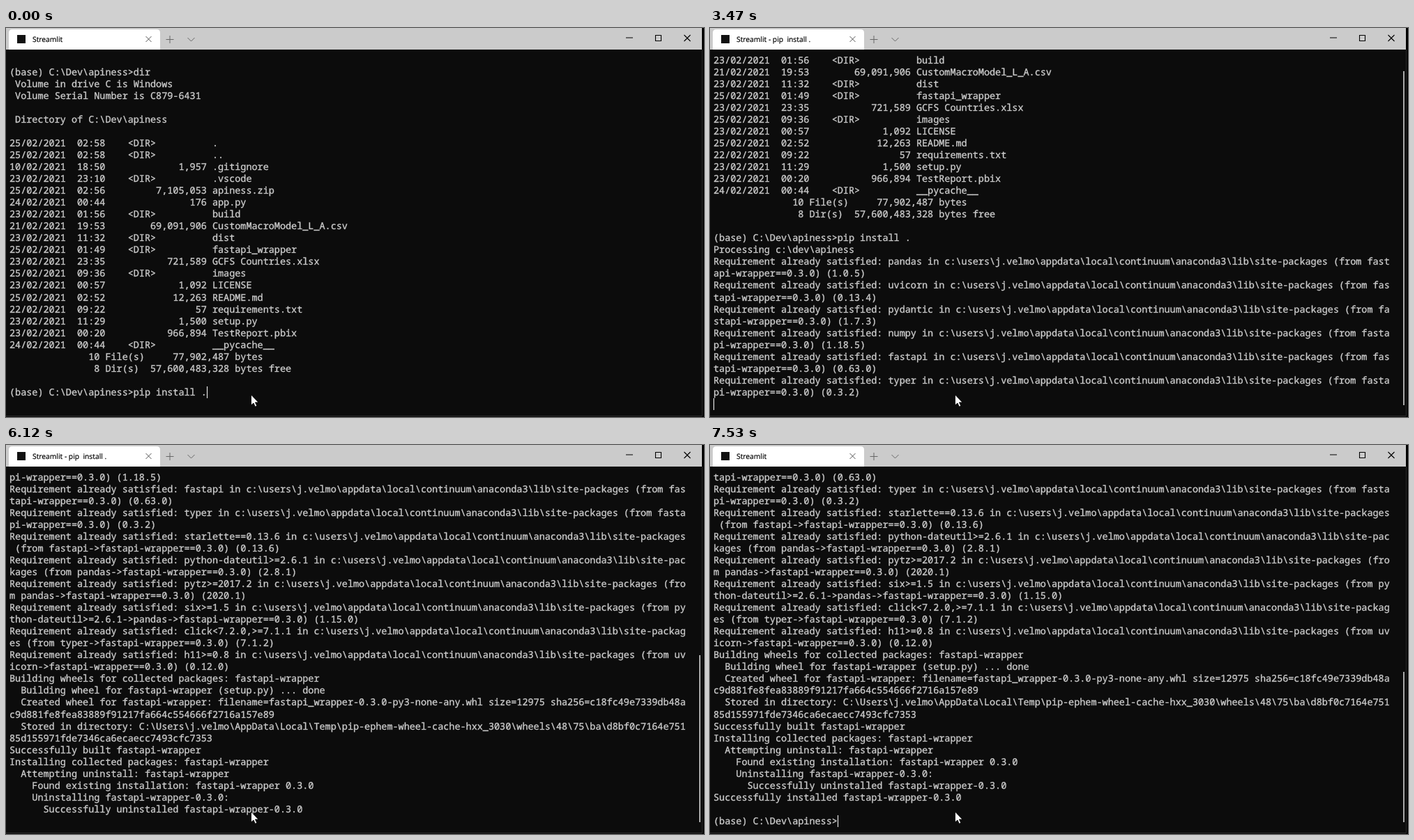
Recreate the animation shown at these times as an HTML page. Size 1001 by 559 pixels, loop 8000 ms.

```html
<!DOCTYPE html>
<html lang="en">
<head>
<meta charset="utf-8">
<title>Terminal</title>
<style>
  html, body { margin: 0; width: 100%; height: 100%; overflow: hidden; background: #0c0c0c; }
  #stage { position: relative; width: 1001px; height: 559px; overflow: hidden; background: #0c0c0c; }
  #stage > * { position: absolute; margin: 0; }
  svg { left: 0; top: 0; }
  #screen {
    left: 5px; top: 37.6px; color: #ccc; white-space: pre;
    font: 13.47px/17.05px "Noto Sans Mono", "DejaVu Sans Mono", monospace;
    text-rendering: geometricPrecision; font-variant-ligatures: none;
    -webkit-text-stroke: .35px #ccc;
  }
  #title {
    left: 38px; top: 9.5px; color: #000; white-space: pre;
    font: 10.3px/15px "Open Sans", "Noto Sans", sans-serif;
    text-rendering: geometricPrecision;
    -webkit-text-stroke: .2px #000;
  }
  #cursor { width: 1px; height: 17px; background: #fff; }
  #bar { left: 994px; width: 2px; background: #aaa; }
</style>
</head>
<body>
<div id="stage">
  <svg width="1001" height="559" fill="none">
    <path d="M0 0H998V31H0Z" fill="#cbcbcb"/>
    <path d="M998 0H1001V559H998Z" fill="#000"/>
    <path d="M998.5 31V557.5H0" stroke="#2a2a2a"/>
    <path d="M4 31V7Q4 2 9 2H216Q221 2 221 7V31Z" fill="#fff"/>
    <rect x="16" y="10" width="12" height="12" fill="#111"/>
    <path d="M200.5 12L208.5 20M208.5 12L200.5 20" stroke="#555"/>
    <path d="M229.5 16.5H240.5M235 11V22M260.5 14L265.5 19L270.5 14" stroke="#666"/>
    <path d="M889 14H899M931.5 10.5H939.5V18.5H931.5ZM972.5 10L981.5 19M981.5 10L972.5 19" stroke="#000" stroke-width="1.1"/>
  </svg>
  <pre id="screen"></pre>
  <div id="title"></div>
  <div id="bar"></div>
  <div id="cursor"></div>
  <svg width="1001" height="559">
    <path d="M351.5 527V542L355 539L357.4 544.2L359.8 543.1L357.4 538H362Z" fill="#fff" stroke="#000" stroke-width=".8"/>
  </svg>
</div>
<script>
const COLS = 120, ROWS = 30, CHAR = 8.082, ROW_H = 17.05, LOOP = 8000;
const prompt = String.raw`(base) C:\Dev\apiness>`;

const listing = String.raw`
${prompt}dir
 Volume in drive C is Windows
 Volume Serial Number is C879-6431

 Directory of C:\Dev\apiness

25/02/2021  02:58    <DIR>          .
25/02/2021  02:58    <DIR>          ..
10/02/2021  18:50             1,957 .gitignore
23/02/2021  23:10    <DIR>          .vscode
25/02/2021  02:56         7,105,053 apiness.zip
24/02/2021  00:44               176 app.py
23/02/2021  01:56    <DIR>          build
21/02/2021  19:53        69,091,906 CustomMacroModel_L_A.csv
23/02/2021  11:32    <DIR>          dist
25/02/2021  01:49    <DIR>          fastapi_wrapper
23/02/2021  23:35           721,589 GCFS Countries.xlsx
25/02/2021  09:36    <DIR>          images
23/02/2021  00:57             1,092 LICENSE
25/02/2021  02:52            12,263 README.md
22/02/2021  09:22                57 requirements.txt
23/02/2021  11:29             1,500 setup.py
23/02/2021  00:20           966,894 TestReport.pbix
24/02/2021  00:44    <DIR>          __pycache__
              10 File(s)     77,902,487 bytes
               8 Dir(s)  57,600,483,328 bytes free

${prompt}pip install .
Processing c:\dev\apiness`;

const sitePackages = String.raw`c:\users\j.velmo\appdata\local\continuum\anaconda3\lib\site-packages`;
const requirements = [
  ["pandas", "", "1.0.5"],
  ["uvicorn", "", "0.13.4"],
  ["pydantic", "", "1.7.3"],
  ["numpy", "", "1.18.5"],
  ["fastapi", "", "0.63.0"],
  ["typer", "", "0.3.2"],
  ["starlette==0.13.6", "fastapi->", "0.13.6"],
  ["python-dateutil>=2.6.1", "pandas->", "2.8.1"],
  ["pytz>=2017.2", "pandas->", "2020.1"],
  ["six>=1.5", "python-dateutil>=2.6.1->pandas->", "1.15.0"],
  ["click<7.2.0,>=7.1.1", "typer->", "7.1.2"],
  ["h11>=0.8", "uvicorn->", "0.12.0"],
].map(([name, via, version]) =>
  `Requirement already satisfied: ${name} in ${sitePackages} (from ${via}fastapi-wrapper==0.3.0) (${version})`);

const building = "  Building wheel for fastapi-wrapper (setup.py) ... ";
const results = String.raw`Building wheels for collected packages: fastapi-wrapper
${building}done
  Created wheel for fastapi-wrapper: filename=fastapi_wrapper-0.3.0-py3-none-any.whl size=12975 sha256=c18fc49e7339db48ac9d881fe8fea83889f91217fa664c554666f2716a157e89
  Stored in directory: C:\Users\j.velmo\AppData\Local\Temp\pip-ephem-wheel-cache-hxx_3030\wheels\48\75\ba\d8bf0c7164e75185d155971fde7346ca6ecaecc7493cfc7353
Successfully built fastapi-wrapper
Installing collected packages: fastapi-wrapper
  Attempting uninstall: fastapi-wrapper
    Found existing installation: fastapi-wrapper 0.3.0
    Uninstalling fastapi-wrapper-0.3.0:
      Successfully uninstalled fastapi-wrapper-0.3.0
Successfully installed fastapi-wrapper-0.3.0

`;

const wrap = line => line.match(new RegExp(`.{1,${COLS}}`, "g")) || [""];
const lines = [...listing.split("\n"), ...requirements, ...results.split("\n")].flatMap(wrap);

// Each track lists [start time, value...]; a value holds until the next entry.
const scrollTrack = [[0, 0], [2100, 1], [3470, 13], [4620, 26], [4980, 31], [5350, 32],
  [6120, 37], [6610, 38], [6980, 39]];
const lastRowTrack = [[0, ""], [4620, building + "-"], [4740, building + "\\"],
  [4860, building + "|"], [4980, ""], [6980, prompt]];
const titleTrack = [[0, "Streamlit"], [970, "Streamlit - pip  install ."], [6980, "Streamlit"]];
// Scroll offset shown by the thumb, which trails the text.
const thumbTrack = [[0, 0], [2220, 1], [3590, 8], [3710, 13], [4740, 20], [4860, 26],
  [4980, 32], [6240, 35], [6360, 37], [6610, 38], [7130, 39]];
// Row and column; no values means the cursor is off.
const cursorTrack = [[0, 28, 35], [430], [840, 28, 35], [970, 29, 0], [1600], [2100, 29, 0],
  [2590], [3220, 29, 0], [3710], [4240, 29, 0], [4620, 29, 53], [4860], [5350, 29, 0],
  [5870], [6360, 29, 0], [6980], [7530, 29, 22]];

const at = (track, t) => track.findLast(([start]) => start <= t).slice(1);
const el = id => document.getElementById(id);
const screenEl = el("screen"), titleEl = el("title"), bar = el("bar"), cursor = el("cursor");

function setText(node, text) {
  if (node.textContent !== text) node.textContent = text;
}

function draw(t) {
  const [top] = at(scrollTrack, t);
  const [lastRow] = at(lastRowTrack, t);
  setText(screenEl, [...lines.slice(top, top + ROWS - 1), lastRow].join("\n"));
  setText(titleEl, at(titleTrack, t)[0]);

  const [offset] = at(thumbTrack, t);
  const height = Math.round(496.5 * ROWS / (ROWS + offset));
  bar.style.display = offset ? "" : "none";
  bar.style.top = 542 - height + "px";
  bar.style.height = height + "px";

  const [row, col] = at(cursorTrack, t);
  cursor.style.display = row === undefined ? "none" : "";
  if (row !== undefined) {
    cursor.style.left = Math.round(5 + col * CHAR) + "px";
    cursor.style.top = Math.round(532 - (ROWS - 1 - row) * ROW_H) + "px";
  }
}

const start = performance.now();
function tick() {
  draw((performance.now() - start) % LOOP);
  requestAnimationFrame(tick);
}
tick();
</script>
</body>
</html>
```
